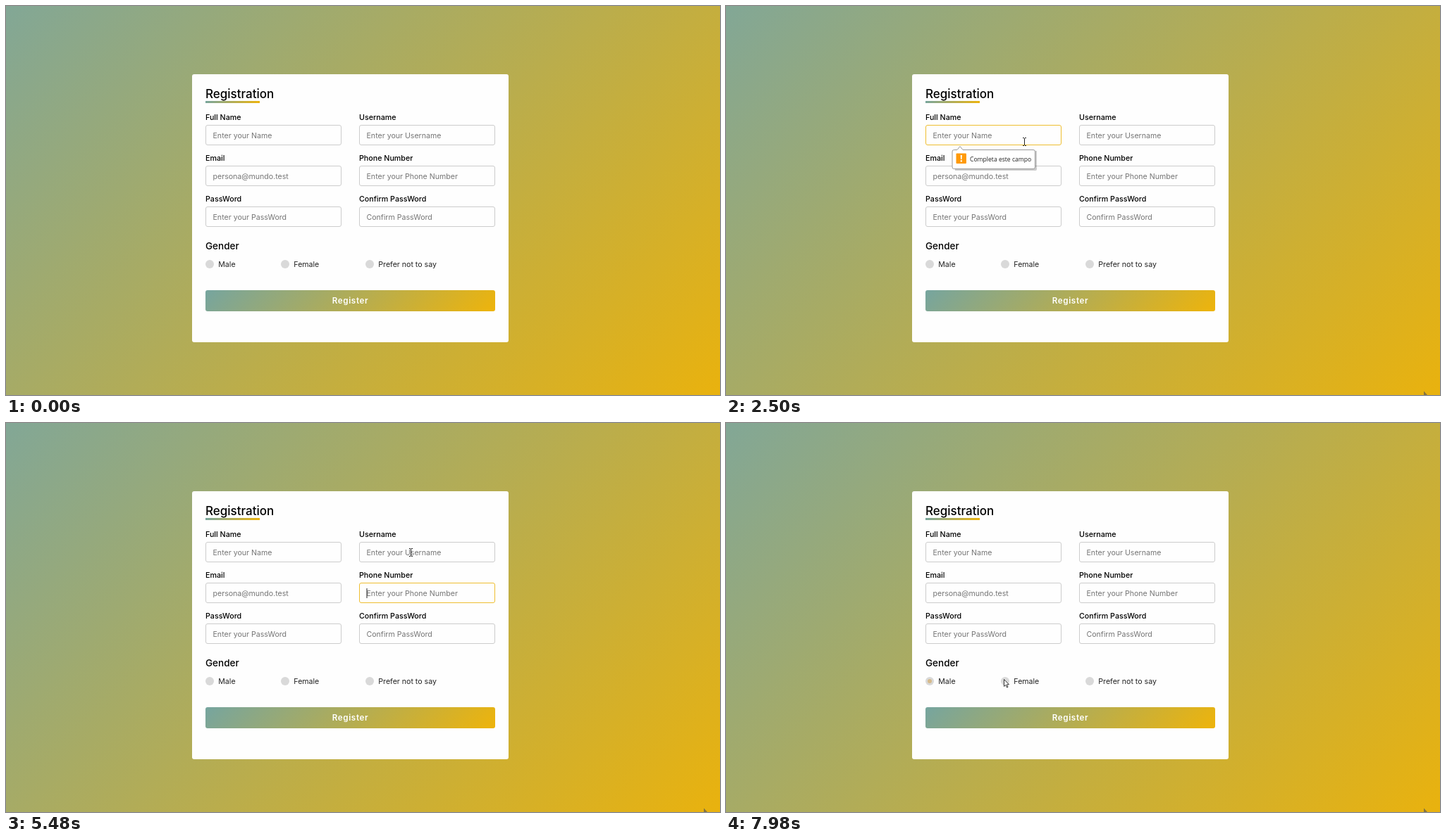
These frames come from a looping animation (1013 px wide and 553 px high, 8 s). An HTML page:

```html
<!DOCTYPE html>
<html lang="en">
<head>
<meta charset="utf-8">
<title>Registration form</title>
<style>
  html, body { margin: 0; width: 100%; height: 100%; overflow: hidden; }
  body { background: linear-gradient(135deg, #82a796, #e9b20e); }
  div, svg { position: absolute; box-sizing: border-box; }
  svg { left: 0; top: 0; font-family: Inter, sans-serif; }
  .card { left: 264px; top: 97px; width: 449px; height: 381px; border-radius: 3px; background: #fefefe; }
  .line { left: 283px; top: 135px; width: 77px; height: 2.5px; background: linear-gradient(135deg, #76a59f, #eeb40b); }
  .field { width: 193px; height: 29px; border: 1px solid #ccc; border-radius: 3px; }
  .button { left: 283px; top: 404px; width: 411px; height: 29.5px; border-radius: 3px; background: linear-gradient(135deg, #76a59f, #eeb40b); }
  .button.hover { background: linear-gradient(-135deg, #76a59f, #eeb40b); }
  .title { font-size: 17px; font-weight: 500; }
  .label { font-size: 10.7px; font-weight: 500; }
  .hint { font-size: 10.6px; fill: #757575; }
  .gender { font-size: 13.5px; font-weight: 500; }
  .option { font-size: 10.6px; fill: #222; }
  .submit { font-size: 11.6px; font-weight: 600; letter-spacing: .64px; fill: #fff; }
  .tip { font: 8.6px "Open Sans", sans-serif; fill: #222; }
</style>
</head>
<body>
<div class="card"></div>
<div class="line"></div>
<div class="button" id="button"></div>
<svg id="art" width="1013" height="553">
  <text class="title" x="283" y="130.5">Registration</text>
  <text class="gender" x="283" y="345.5">Gender</text>
  <text class="submit" x="488.5" y="423" text-anchor="middle">Register</text>
  <g id="form"></g>
  <circle id="dot" cx="289" cy="367" r="3" fill="#d6ba8b"/>
  <rect id="caret" width="1" height="14" fill="#222"/>
  <!-- Drawn from the bubble's top left corner -->
  <g id="tip">
    <path d="M5 6h116v26q0 2-2 2H5z" opacity=".2"/>
    <path d="M3.5 4.5H8l4-5 4 5h100q2.500 0 2.500 2.500v22q0 2.500-2.500 2.500H3.500Q1 31.500 1 29V7q0-2.500 2.500-2.500z" fill="#fff" stroke="#999"/>
    <rect x="6.500" y="9.500" width="14.500" height="14.500" rx="1" fill="#ff9a0a"/>
    <path d="M12.700 12h2.200l-.4 6h-1.400zM12.700 19.200h2.200v2.200h-2.200z" fill="#fff"/>
    <text class="tip" x="26" y="20.500">Completa este campo</text>
  </g>
  <path id="corner" d="M990 547.500l5 5.500h-5z" fill="#85733d"/>
  <circle id="press" r="8" fill="#fff12e" opacity=".65"/>
  <path id="arrow" d="M.5 .5v10l2.300-2.100 1.700 3.600 1.500-.7-1.600-3.500h3.100z" fill="#fff" stroke="#222" stroke-width=".9"/>
  <path id="beam" d="M-2-5.500H0M1-5.500H3M.5-5V5M-2 5.500H0M1 5.500H3" stroke="#222"/>
</svg>
<script>
const $ = id => document.getElementById(id);
const DURATION = 8000, PRESS = 130, BLINK = 1060;

const fields = [
  ["Full Name", "Enter your Name"], ["Username", "Enter your Username"],
  ["Email", "persona@mundo.test"], ["Phone Number", "Enter your Phone Number"],
  ["PassWord", "Enter your PassWord"], ["Confirm PassWord", "Confirm PassWord"]
].map(([label, hint], i) => {
  const x = i % 2 ? 501 : 283, y = 169 + 58 * (i >> 1);
  const box = document.createElement("div");
  box.className = "field";
  box.style.left = x + "px";
  box.style.top = y + "px";
  document.body.insertBefore(box, $("art"));
  addText("label", x, y - 7, label);
  addText("hint", x + 10.5, y + 18.5, hint);
  return { x, y, w: 193, box };
});
const button = { x: 283, y: 404, w: 411 };

[[289, "Male"], [396, "Female"], [516, "Prefer not to say"]].forEach(([x, name]) => {
  $("form").innerHTML += `<circle cx="${x}" cy="367" r="6" fill="#d9d9d9"/>`;
  addText("option", x + 12.3, 371, name);
});

function addText(kind, x, y, words) {
  $("form").innerHTML += `<text class="${kind}" x="${x}" y="${y}">${words}</text>`;
}

// The pointer eases from stop to stop and rests between arrive and leave.
const pass = (arrive, x, y) => ({ arrive, leave: arrive, x, y });
const click = (arrive, press, x, y, field, rest = PRESS) =>
  ({ arrive, press, leave: press + rest, x, y, field });
const clickField = (arrive, press, i) =>
  click(arrive, press, fields[i].x + (i % 2 ? 73 : 163), fields[i].y + 15, i);

const stops = [
  pass(440, 988, 547),
  click(1000, 1330, 489, 415, 0, 420),
  pass(2080, 575, 277),
  pass(2500, 423, 193),
  clickField(3070, 3270, 2),
  clickField(3820, 4020, 4),
  clickField(4570, 4640, 5),
  clickField(5050, 5060, 3),
  clickField(5460, 5550, 1),
  click(6460, 6530, 290, 376, -1, 750),
  pass(DURATION, 394, 364)
];
const clicks = stops.filter(s => s.press);

// The button hands focus to the first empty field once it is released.
const focuses = [{ time: 0, field: -1 }, ...clicks.map(({ press, field }) =>
  ({ time: press + (field ? 0 : PRESS), field }))];

const ramp = (t, start, length) => Math.min(1, Math.max(0, (t - start) / length));
const show = (id, on) => $(id).setAttribute("visibility", on ? "visible" : "hidden");
const move = (id, x, y, scale = 1) => $(id).setAttribute("transform", `translate(${x} ${y}) scale(${scale})`);
const inside = (x, y, r) => x >= r.x && x < r.x + r.w && y >= r.y && y < r.y + 29;

function pointerAt(t) {
  const i = Math.max(0, stops.findLastIndex(s => s.arrive <= t));
  const a = stops[i], b = stops[i + 1] || a;
  const k = ramp(t, a.leave, b.arrive - a.leave);
  const e = k * k * (3 - 2 * k);
  return [a.x + (b.x - a.x) * e, a.y + (b.y - a.y) * e].map(Math.round);
}

function borderColor(k) {
  const from = [204, 204, 204], to = [238, 190, 48];
  return `rgb(${from.map((c, i) => c + (to[i] - c) * k)})`;
}

function drawPointer(t) {
  const [x, y] = pointerAt(t);
  const active = t >= stops[0].arrive;
  const overField = fields.some(f => inside(x, y, f));
  $("button").classList.toggle("hover", active && inside(x, y, button));
  show("corner", active);
  show("arrow", active && !overField);
  show("beam", active && overField);
  show("press", clicks.some(({ press }) => t >= press && t < press + PRESS));
  ["arrow", "beam", "press"].forEach(id => move(id, x, y));
}

function drawForm(t) {
  const n = focuses.findLastIndex(f => f.time <= t);
  const { time, field: current } = focuses[n];
  const previous = n ? focuses[n - 1].field : -1;
  const fade = ramp(t, time, 150);
  fields.forEach((f, i) => {
    f.box.style.borderColor = borderColor(i === current ? fade : i === previous ? 1 - fade : 0);
  });
  const field = fields[current];
  show("caret", field && (t - time) % BLINK < BLINK / 2);
  if (field) move("caret", field.x + 10.5, field.y + 8);

  const tip = current === 0 ? ramp(t, 1700, 250) : 0;
  $("tip").setAttribute("opacity", tip);
  move("tip", 320, 200, 0.96 + 0.04 * tip);
  $("dot").setAttribute("opacity", ramp(t, 6660, 200));
}

function frame() {
  const t = performance.now() % DURATION;
  drawPointer(t);
  drawForm(t);
  requestAnimationFrame(frame);
}
frame();
</script>
</body>
</html>
```
